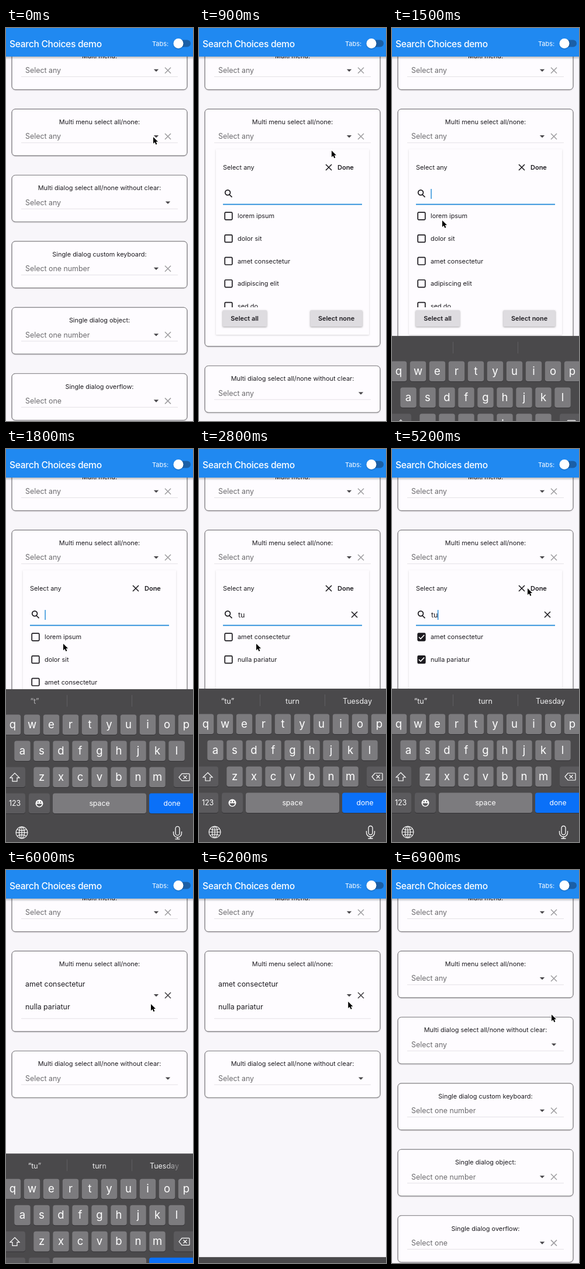
These frames come from a looping animation (320 px wide and 674 px high, 7000 ms). An HTML page with a canvas:

```html
<!DOCTYPE html>
<html lang="en">
<head>
<meta charset="utf-8">
<title>Search Choices demo</title>
<style>
  html, body { margin: 0; width: 100%; height: 100%; overflow: hidden; background: #f8f6fa; }
  canvas { display: block; width: 320px; height: 674px; }
</style>
</head>
<body>
<canvas id="stage"></canvas>
<script>
const W = 320, H = 674, LOOP = 7000, STEP = 100;
const PAGE = '#f8f6fa', CARD = '#fefcff', INK = '#1d1b20', GREY = '#6c6b6e', BLUE = '#2089f1';
const OPEN = 600, CLOSE = 5800, CLEAR = 6900;
const TYPE_T = 1900, TYPE_U = 2200, CHECKS = [4100, 4700];
const KEYS_TOP = 411, KEYS_UP = 1407, KEYS_DOWN = 5947;
const WORDS = ['lorem ipsum', 'dolor sit', 'amet consectetur', 'adipiscing elit', 'sed do'];
const CARDS = ['Multi dialog select all/none without clear:', 'Single dialog custom keyboard:',
  'Single dialog object:', 'Single dialog overflow:'];
const HINTS = ['Select any', 'Select one number', 'Select one number', 'Select one'];
// Pointer stops: time, x, y
const PATH = [[0, 252, 187], [100, 252, 187], [200, 253, 188], [700, 253, 188], [1500, 86, 330],
  [1800, 98, 334], [2800, 98, 334], [3800, 57, 322], [4200, 57, 322], [4600, 53, 360],
  [4800, 53, 360], [5200, 232, 239], [5500, 247, 240], [5800, 247, 240], [6000, 248, 230],
  [6600, 276, 214], [6800, 276, 214], [6900, 273, 248]];

const canvas = document.getElementById('stage');
const ctx = canvas.getContext('2d');
const ratio = window.devicePixelRatio || 1;
canvas.width = W * ratio;
canvas.height = H * ratio;

function text(s, x, y, size, color = INK, align = 'left', weight = 400, spacing = 0) {
  ctx.font = `${weight} ${size}px Inter, Roboto, sans-serif`;
  ctx.letterSpacing = spacing + 'px';
  ctx.textAlign = align;
  ctx.fillStyle = color;
  ctx.fillText(s, x, y + size * 0.36);
}

function rect(x, y, w, h, color) {
  ctx.fillStyle = color;
  ctx.fillRect(x, y, w, h);
}

function box(x, y, w, h, r, fill, shadow = 0, alpha = 0.25) {
  ctx.save();
  if (shadow) {
    ctx.shadowColor = `rgba(0,0,0,${alpha})`;
    ctx.shadowBlur = shadow * ratio;
    ctx.shadowOffsetY = ratio;
  }
  ctx.beginPath();
  ctx.roundRect(x, y, w, h, r);
  ctx.fillStyle = fill;
  ctx.fill();
  ctx.restore();
}

function line(d, x, y, color, width) {
  ctx.save();
  ctx.translate(x, y);
  ctx.strokeStyle = color;
  ctx.lineWidth = width;
  ctx.stroke(new Path2D(d));
  ctx.restore();
}

function shape(d, x, y, color) {
  ctx.save();
  ctx.translate(x, y);
  ctx.fillStyle = color;
  ctx.fill(new Path2D(d));
  ctx.restore();
}

const cross = (x, y, color, r = 5) => line(`M${-r} ${-r}L${r} ${r}M${r} ${-r}L${-r} ${r}`, x, y, color, 1.6);
const arrow = (x, y) => shape('M-4.2 -2h8.4l-4.2 4.3z', x, y, '#49474b');

function frame(y, h, title) {
  box(10, y, 300, h, 6, CARD, 2);
  ctx.strokeStyle = '#8f8d91';
  ctx.lineWidth = 1;
  ctx.stroke();
  ctx.beginPath();
  ctx.roundRect(10, y, 300, h, 6);
  ctx.stroke();
  text(title, 160, y + 22, 10.9, INK, 'center');
}

function select(y, hint, clear = true) {
  text(hint, 33, y + 47, 12.4, GREY);
  rect(26, y + 57.3, 268, 1, '#e4e2e6');
  arrow(clear ? 257 : 277, y + 47);
  if (clear) cross(277, y + 47, '#a09fa2');
}

function chosen(y) {
  text('amet consectetur', 33, y + 57, 12.4);
  text('nulla pariatur', 33, y + 95.5, 12.4);
  rect(26, y + 115.3, 268, 1, '#e4e2e6');
  arrow(257, y + 76);
  cross(277, y + 76, '#454347');
}

function option(label, y, checked) {
  ctx.beginPath();
  ctx.roundRect(44.2, y - 6.3, 12.6, 12.6, 1.5);
  ctx.strokeStyle = ctx.fillStyle = INK;
  ctx.lineWidth = 1.7;
  ctx.stroke();
  if (checked) {
    ctx.fill();
    line('M-4.5 0L-1.5 3L4.7 -3.5', 50.5, y, '#fff', 1.6);
  }
  text(label, 66, y, 10.9);
}

function caretOn(t) {
  const start = t < TYPE_T ? 1400 : t < TYPE_U ? TYPE_T : TYPE_U;
  return t >= 1400 && Math.floor((t - start) / 500) % 2 === 0;
}

function menu(t) {
  box(29, 208, 262, 318, 1, CARD, 3, 0.16);
  text('Select any', 41, 239, 10.9);
  cross(222, 239, INK);
  text('Done', 237, 239, 11, INK, 'left', 600);

  line('M3 3L7.2 7.2M4.2 -.8A4.4 4.4 0 1 1 -4.6 -.8A4.4 4.4 0 1 1 4.2 -.8', 49.3, 283, INK, 1.7);
  const typed = t < TYPE_T ? '' : t < TYPE_U ? 't' : 'tu';
  text(typed, 67, 284, 12.6);
  if (caretOn(t)) rect(66.4 + ctx.measureText(typed).width, 276, 1.4, 17, '#1e88d8');
  if (typed) cross(266, 284, INK);
  rect(41, 301.6, 238, 1.8, '#1e88d8');

  const list = typed === 'tu' ? ['amet consectetur', 'nulla pariatur'] : WORDS.filter(w => w.includes(typed));
  ctx.save();
  ctx.beginPath();
  ctx.rect(30, 304, 260, 175);
  ctx.clip();
  list.forEach((w, i) => option(w, 322.5 + 38.6 * i, t >= CHECKS[i]));
  ctx.restore();

  box(40.5, 484, 75.5, 28, 1.5, '#dedce0', 3, 0.35);
  text('Select all', 78, 498, 10.9, INK, 'center', 600);
  box(190.5, 484, 89, 28, 1.5, '#dedce0', 3, 0.35);
  text('Select none', 235, 498, 10.9, INK, 'center', 600);
}

function header() {
  const shade = ctx.createLinearGradient(0, 49, 0, 54);
  shade.addColorStop(0, 'rgba(0,0,0,.25)');
  shade.addColorStop(1, 'rgba(0,0,0,0)');
  rect(0, 49, W, 5, shade);
  rect(0, 0, W, 49, BLUE);
  text('Search Choices demo', 6, 27, 15.6, '#fff', 'left', 500, -0.3);
  text('Tabs:', 250, 27, 11, '#fff');
  box(287, 20.5, 29, 12, 6, '#1b5fa6');
  box(286.5, 18, 17, 17, 8.5, '#fff', 2);
}

function key(x, y, w, label, size, fill = '#7c7b7e') {
  box(x - w / 2, y + 1, w, 34.5, 4, '#343336');
  box(x - w / 2, y, w, 34.5, 4, fill);
  text(label, x, y + 17, size, '#fff', 'center');
}

function hints(t, y) {
  const words = t < 1800 ? [] : t < 2000 ? ['“t”'] : t < TYPE_U ? ['“t”', 'the', 'to'] : ['“tu”', 'turn', 'Tuesday'];
  words.forEach((w, i) => {
    const x = 49 + 111 * i;
    let color = t === 1800 ? '#b5b4b6' : '#f2f2f3';
    if (t >= 5900) {
      const fade = ctx.createLinearGradient(x, 0, x + 28, 0);
      fade.addColorStop(0, '#f2f2f3');
      fade.addColorStop(1, '#6a696c');
      color = fade;
    }
    text(w, x, y + 21, 12.5, color, 'center');
  });
  for (const x of [104, 215]) rect(x, y + 10, 1, 20, '#5f5e61');
}

function keyboard(t, y) {
  const dark = '#5b5a5d';
  rect(0, y, W, H - y, '#4a494b');
  hints(t, y);
  [['qwertyuiop', 11.5, 43.5], ['asdfghjkl', 28, 88.5], ['zxcvbnm', 61, 133.5]].forEach(([row, x, top]) =>
    [...row].forEach((c, i) => key(x + 33 * i, y + top, 27.5, c, 18.5)));

  key(15, y + 133.5, 36, '', 12, dark);
  line('M0 -7L8 1H4V7H-4V1H-8Z', 15, y + 151, '#fff', 1.2);
  key(305, y + 133.5, 36, '', 12, dark);
  line('M-9 0L-4 -6H8Q9 -6 9 -5V5Q9 6 8 6H-4ZM-1.5 -3L4.5 3M4.5 -3L-1.5 3', 305, y + 151, '#fff', 1.2);

  key(15, y + 178.5, 36, '123', 12.4, dark);
  key(57, y + 178.5, 36, '', 12, dark);
  box(50.5, y + 189.5, 13, 13, 6.5, '#fff');
  shape('M-4.5 .5H4.5A4.5 4.5 0 0 1 -4.5 .5ZM-3.2 -3.5h2v2.2h-2zM1.2 -3.5h2v2.2h-2z', 57, y + 196, dark);
  key(160, y + 178.5, 160, 'space', 12.3);
  key(284, y + 178.5, 78, 'done', 12.2, '#0a70f8');

  line('M-10 0A10 10 0 1 1 10 0A10 10 0 1 1 -10 0M-4.5 0A4.5 10 0 1 1 4.5 0A4.5 10 0 1 1 -4.5 0' +
    'M-10 0H10M0 -10V10M-8 -5.5Q0 -2 8 -5.5M-8 5.5Q0 2 8 5.5', 27, y + 246, '#fff', 1.1);
  line('M-3.5 -7A3.5 3.5 0 0 1 3.5 -7V1A3.5 3.5 0 0 1 -3.5 1ZM-7 -2V1A7 7 0 0 0 7 1V-2M0 8V11M-4 11H4',
    293.5, y + 246, '#fff', 1.3);
}

// Share of the way still to go for a critically damped spring
function spring(dt) {
  const k = Math.max(0, dt) * 0.02;
  return (1 + k) * Math.exp(-k);
}

function pointer(t) {
  const i = Math.max(1, PATH.findIndex(p => p[0] >= t));
  const [t0, x0, y0] = PATH[i - 1], [t1, x1, y1] = PATH[i];
  const u = (t - t0) / (t1 - t0), e = u * u * (3 - 2 * u);
  const d = 'M0 0V11.2L2.6 8.8L4.5 13L6.4 12.1L4.6 8.1H8Z';
  const x = x0 + (x1 - x0) * e, y = y0 + (y1 - y0) * e;
  line(d, x, y, '#fff', 1.6);
  shape(d, x, y, '#000');
}

function draw(t) {
  ctx.setTransform(ratio, 0, 0, ratio, 0, 0);
  rect(0, 0, W, H, PAGE);

  frame(25.7, 80, 'Multi menu:');
  select(25.7, 'Select any');

  const opened = t >= OPEN && t < CLOSE, picked = t >= CLOSE && t < CLEAR;
  const top = 139, height = opened ? 407 : picked ? 138 : 80;
  frame(top, height, 'Multi menu select all/none:');
  if (picked) chosen(top);
  else select(top, 'Select any');
  CARDS.forEach((title, i) => {
    const y = top + height + 33.4 + 113.4 * i;
    frame(y, 80, title);
    select(y, HINTS[i], i > 0);
  });
  if (opened) menu(t);
  header();

  if (t >= CLOSE && t < 6300) rect(0, KEYS_TOP, W, H - KEYS_TOP, PAGE);
  const hidden = t < KEYS_DOWN ? spring(t - KEYS_UP) : 1 - spring(t - KEYS_DOWN);
  if (hidden < 0.998) keyboard(t, KEYS_TOP + (H - KEYS_TOP) * hidden);
  pointer(t);
}

function tick(now) {
  draw(Math.floor(now % LOOP / STEP) * STEP);
  requestAnimationFrame(tick);
}
requestAnimationFrame(tick);
</script>
</body>
</html>
```
